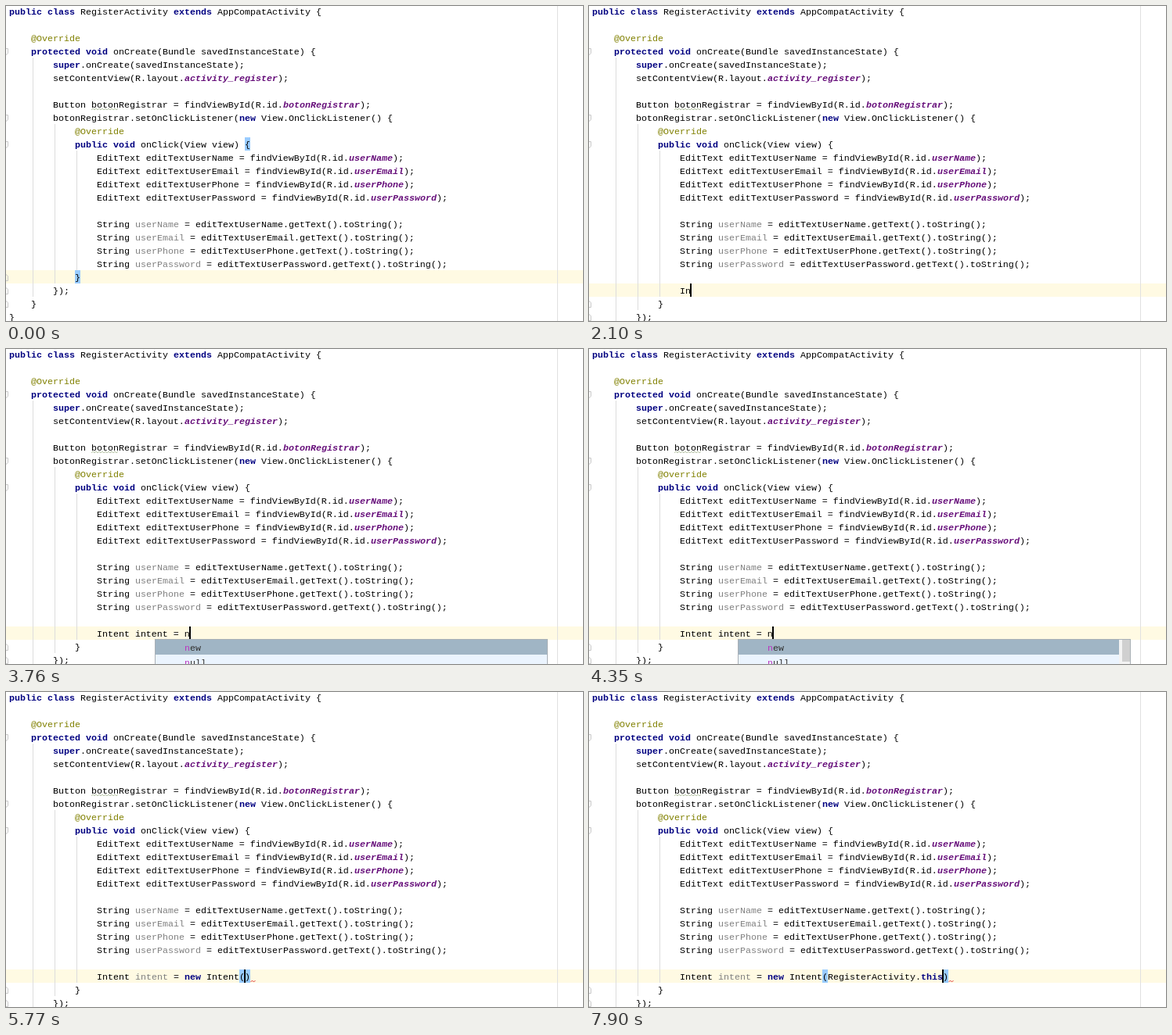
Write an HTML page with a canvas that moves like this. It is 737 by 403 pixels and loops after 8 s.

```html
<!DOCTYPE html>
<html lang="en">
<head>
<meta charset="utf-8">
<title>Code editor</title>
<style>
html, body { margin: 0; height: 100%; overflow: hidden; background: #fff; }
canvas { display: block; }
</style>
</head>
<body>
<canvas id="stage" width="737" height="403"></canvas>
<script>
const ctx = document.getElementById("stage").getContext("2d");
const LOOP = 8000, CELL = 7, ROW = 17, LEFT = 4;
const MONO = '11.667px "Liberation Mono", monospace';
const colX = col => LEFT + col * CELL;
const rowTop = row => row * ROW - 2;

const head = `public class RegisterActivity extends AppCompatActivity {

    @Override
    protected void onCreate(Bundle savedInstanceState) {
        super.onCreate(savedInstanceState);
        setContentView(R.layout.activity_register);

        Button botonRegistrar = findViewById(R.id.botonRegistrar);
        botonRegistrar.setOnClickListener(new View.OnClickListener() {
            @Override
            public void onClick(View view) {`.split("\n");
const fields = ["Name", "Email", "Phone", "Password"];
const body = [
  ...fields.map(f => `EditText editTextUser${f} = findViewById(R.id.user${f});`),
  "",
  ...fields.map(f => `String user${f} = editTextUser${f}.getText().toString();`)
].map(s => " ".repeat(16) + s);
const before = [...head, ...body];
const after = ["            }", "        });", "    }", "}"];

const intentRows = ["Intent (android.content)", "IntentFilter (android.content)"];
const menus = {
  type: { x: 78, w: 502, rows: intentRows, bar: true, icon: true },
  name: { x: 154, w: 337, rows: ["intent"], pad: 11,
    hint: "Press Ctrl+Mayús+Espacio to show only variants that are suitable by type" },
  value: { x: 190, w: 502, rows: ["new", "null"] },
  valueBar: { x: 190, w: 502, rows: ["new", "null"], bar: true },
  make: { x: 218, w: 502, rows: intentRows, bar: true, icon: true },
  arg: { x: 267, w: 502, rows: ["RegisterActivity", "Register (java.lang)"], icon: true },
  member: { x: 386, w: 502, rows: ["this", "class"] },
  last: { x: 386, w: 502, rows: ["this"] }
};

// [time, text before the caret, open menu]
const typing = [
  [1500, ""], [1960, "I"], [2040, "In"], [2110, "In", "type"], [2180, "Int", "type"],
  [2320, "Inte", "type"], [2400, "Inten", "type"], [2480, "Intent", "type"],
  [2710, "Intent "], [2780, "Intent i"], [2850, "Intent in", "name"], [2930, "Intent int", "name"],
  [3160, "Intent intent"], [3320, "Intent intent "], [3460, "Intent intent ="],
  [3540, "Intent intent = "], [3640, "Intent intent = n"], [3740, "Intent intent = n", "value"],
  [4350, "Intent intent = n", "valueBar"], [4660, "Intent intent = ne", "valueBar"],
  [4740, "Intent intent = new", "valueBar"], [4880, "Intent intent = new "],
  [5110, "Intent intent = new I"],
  ...["I", "In", "Int", "Inte", "Inten", "Intent"].map((s, i) =>
    [5250 + i * 74, "Intent intent = new " + s, "make"]),
  ...[
    [5770, ""], [6620, "R"], [6700, "Re"], [6840, "Reg", "arg"], [6900, "Regi", "arg"],
    [7210, "RegisterActivity"], [7440, "RegisterActivity.", "member"],
    [7520, "RegisterActivity.t", "member"], [7660, "RegisterActivity.th", "member"],
    [7740, "RegisterActivity.thi", "last"], [7900, "RegisterActivity.this"]
  ].map(([t, s, menu]) => [t, "Intent intent = new Intent(" + s, menu])
];

const token = /(@\w+)|\b(public|class|extends|protected|void|super|new|this|int)\b|(?<=R\.\w+\.)(\w+)|(?<=(?:String|Intent) )(\w+)(?= =)/g;
const styles = [["", "#808000"], ["bold ", "#000080"], ["italic bold ", "#660e7a"], ["", "#808080"]];

function rect(x, y, w, h, color) {
  ctx.fillStyle = color;
  ctx.fillRect(x, y, w, h);
}

function text(s, x, y, color = "#000", style = "", font = MONO) {
  ctx.font = style + font;
  ctx.fillStyle = color;
  ctx.fillText(s, x, y);
}

function path(color, ...points) {
  ctx.strokeStyle = color;
  ctx.lineWidth = 1;
  ctx.beginPath();
  points.forEach(([x, y]) => ctx.lineTo(x, y));
  ctx.stroke();
}

function wave(x, y, width, color) {
  const points = [];
  for (let i = 0; i <= width; i += 2) points.push([x + i, y + (i % 4 ? 0 : 2)]);
  path(color, ...points);
}

function codeLine(line, row, grayNames = true) {
  const y = row * ROW + 11;
  let at = 0;
  const plain = end => {
    text(line.slice(at, end), colX(at), y);
    at = end;
  };
  for (const m of line.matchAll(token)) {
    const kind = m.slice(1).findIndex(Boolean);
    if (kind === 3 && !grayNames) continue;
    plain(m.index);
    text(m[0], colX(at), y, styles[kind][1], styles[kind][0]);
    at += m[0].length;
  }
  plain(line.length);
}

function brace(col, row) {
  rect(colX(col), rowTop(row), CELL, ROW, "#99ccff");
}

function fold(row, closing) {
  const y = row * ROW + 7.5, d = closing ? -1 : 1;
  path("#c8c8c8", [0, y - 4 * d], [2.5, y - 4 * d], [2.5, y + 2 * d], [0, y + 4 * d]);
}

function drawMenu({ x, w, rows, pad = 38, bar, icon, hint }, prefix) {
  const top = 372, rowH = 19;
  const height = hint ? 60 : rows.length > 1 ? 60 : rowH + 1;
  rect(x, top, w, height, "#ebf4fe");
  rect(x + 1, top, w - (bar ? 16 : 2), rowH, "#a0b5c5");
  rows.forEach((s, i) => {
    const y = top + 14 + i * rowH;
    if (icon) {
      ctx.fillStyle = "#7fb2d6";
      ctx.beginPath();
      ctx.arc(x + 15, y - 4, 6, 0, 7);
      ctx.fill();
    }
    const n = s.startsWith(prefix) ? prefix.length : 0;
    text(s.slice(0, n), x + pad, y, "#b932c0");
    text(s.slice(n), x + pad + n * CELL, y, "#303030");
  });
  if (hint) {
    rect(x, top + rowH, w, 40, "#f2f2f2");
    text(hint, x + 6, 403, "#777", "", '9.4px "Open Sans", sans-serif');
  }
  if (bar) {
    rect(x + w - 15, top, 14, 60, "#f3f3f3");
    rect(x + w - 11, top, 10, 28, "#d0d0d0");
  }
  ctx.strokeStyle = "#a9b0b6";
  ctx.strokeRect(x + .5, top - .5, w - 1, height);
}

function iBeam(t) {
  const stops = [[130, 621, 364], [210, 612, 352], [290, 603, 340], [430, 603, 332]];
  const [, x, y] = stops.findLast(s => t >= s[0]);
  rect(x, y, 7, 1, "#000");
  rect(x + 3, y, 1, 16, "#000");
  rect(x, y + 15, 7, 1, "#000");
}

function bulb() {
  ctx.fillStyle = "#f5cf58";
  ctx.beginPath();
  ctx.arc(18, 358, 4.5, 0, 7);
  ctx.fill();
  rect(16, 363, 4, 3, "#8c8c8c");
}

function draw(t) {
  const added = t < 1360 ? 0 : t < 1500 ? 1 : 2;
  const current = t < 590 ? 20 : t < 1360 ? 19 : 19 + added;
  const [, typed, menu] = typing.findLast(s => t >= s[0]) || [0, ""];
  const open = typed.indexOf("(");
  const caretCol = current === 19 ? before[19].length : 16 + typed.length;
  const end = 20 + added;

  rect(0, 0, 737, 403, "#fff");
  rect(0, rowTop(current), 737, ROW, "#fffae3");
  rect(704, 0, 1, 403, "#e0e0e0");
  [[4, 4, end + 2], [8, 9, end + 1], [12, 11, end]].forEach(([col, from, to]) =>
    rect(colX(col) + 2, rowTop(from), 1, (to - from) * ROW, "#dcdcdc"));
  [3, 8, 10].forEach(row => fold(row));
  [0, 1, 2].forEach(i => fold(end + i, true));

  if (t < 590) {
    brace(43, 10);
    brace(12, 20);
  }
  if (open >= 0) {
    brace(16 + open, 21);
    brace(caretCol, 21);
    wave(colX(caretCol + 1) + .5, 369, 6, "#e04040");
  }

  before.forEach((line, row) => codeLine(line, row));
  after.forEach((line, i) => codeLine(line, end + i));
  codeLine(" ".repeat(16) + typed + (open >= 0 ? ")" : ""), 21, t >= 5030);
  wave(109, 131, 34, "#b9c6a9");

  const blinkOff = t >= 6460 && t < 6620;
  if (t >= 590 && !blinkOff) rect(colX(caretCol) - 1, rowTop(current), 2, ROW, "#000");
  if (menu) drawMenu(menus[menu], typed.match(/\w*$/)[0]);
  if (t >= 130 && t < 590) iBeam(t);
  if (t >= 6310 && t < 6620) bulb();
}

function tick() {
  draw(performance.now() % LOOP);
  requestAnimationFrame(tick);
}
tick();
</script>
</body>
</html>
```
